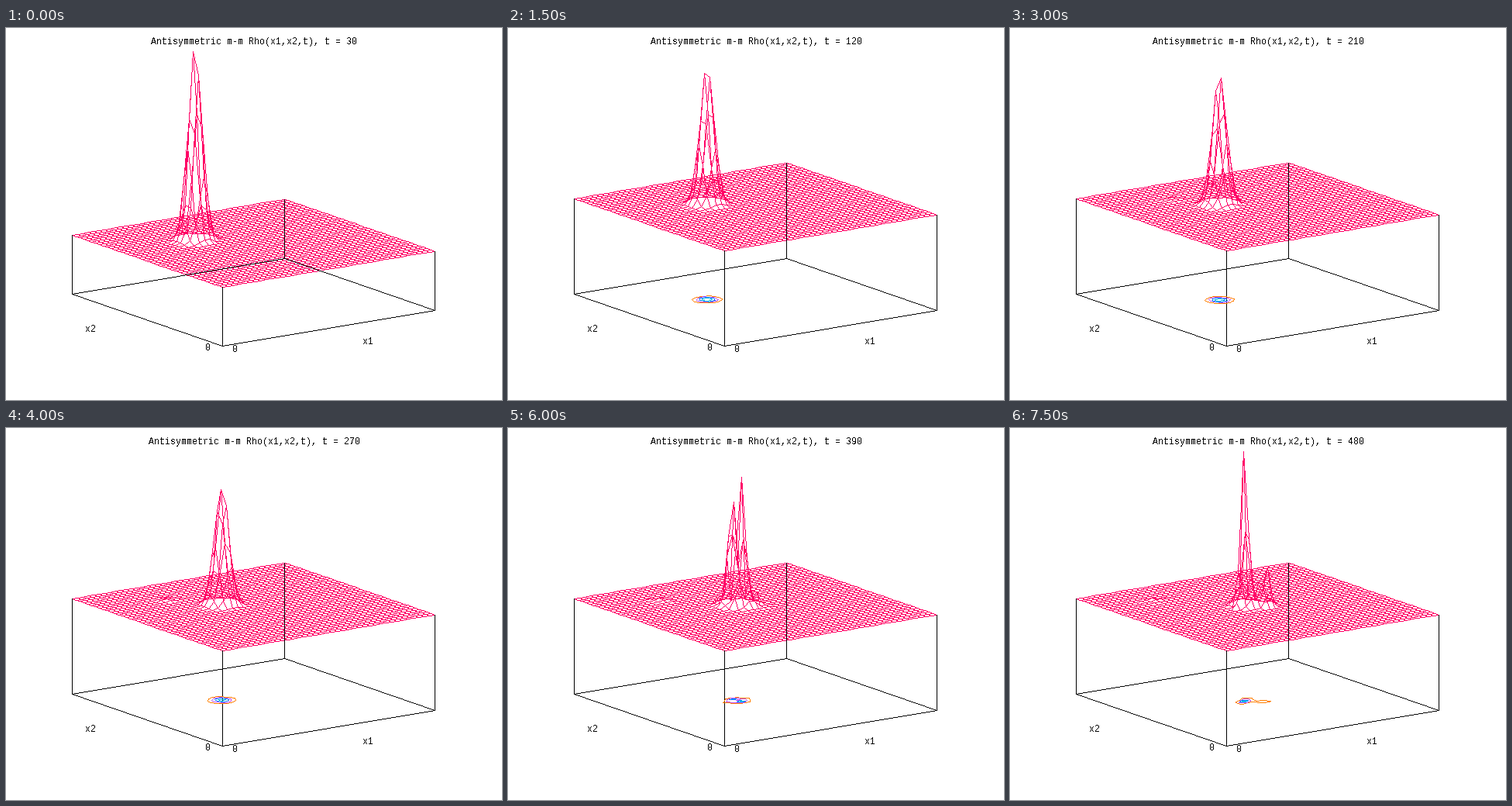
These frames come from a looping animation (640x480 px, 8 s). A matplotlib script:

```python
import numpy as np
import matplotlib.pyplot as plt
from matplotlib.animation import FuncAnimation
from matplotlib.colors import to_rgb

W, H, DPI = 640, 480, 100
FRAMES, STEP = 16, 500
N = 39                       # mesh cells per side
TOP = 27                     # the surface is cut off above this row
PINK = "#ff0066"
LEVELS = [27, 60, 95, 130]
LEVEL_COLORS = ["#ff8000", "#c050ff", "#0080ff", "#00b8e8"]

plt.rcParams.update({
    "font.family": "Liberation Mono",
    "font.size": 11.67 * 72 / DPI,
    "text.antialiased": False,
})

fig = plt.figure(figsize=(W / DPI, H / DPI), dpi=DPI, facecolor="white")
ax = fig.add_axes([0, 0, 1, 1])
ax.axis("off")
screen = ax.imshow(np.ones((H, W, 3)), aspect="auto", interpolation="nearest")
ax.set_autoscale_on(False)

ticks = np.linspace(0, 1, N + 1)
A, B = np.meshgrid(ticks, ticks, indexing="ij")


def project(a, b):
    return 279 + 274 * a - 194 * b, 410 - 46.5 * a - 67 * b


def unproject(x, rise):
    """Plane coordinates of a screen x and a rise above the front corner."""
    return np.linalg.solve([[274, -194], [46.5, 67]], [x - 279, rise])


def bump(x, rise, su, sv):
    """Gaussian with widths along the difference and sum of coordinates."""
    a, b = unproject(x, rise)
    u, v = (A - B) - (a - b), (A + B) - (a + b)
    return np.exp(-u**2 / (4 * su**2) - v**2 / (4 * sv**2))


def ramp(k, start, end):
    return float(np.clip((k - start) / (end - start), 0, 1))


GX, GY = project(A, B)


def density(k):
    x = np.interp(k, [0, 3, 6, 8, 12, 15], [243.5, 256.5, 270, 278, 294.5, 301.7])
    amp = 255 if k < 3 else np.interp(k, [3, 6, 8, 12, 15], [185, 174, 159, 225, 185])
    rise = 60.5 - k / 7
    width = 0.028 - 0.011 * ramp(k, 12, 15)
    fringe = np.sin(np.pi * (GX - 301) / 9.3) ** 2
    z = amp * bump(x, rise, width, 0.028)
    z = z + 38 * ramp(k, 9, 15) * bump(310, 58, 0.035, 0.026)
    z = z * (1 - 0.8 * ramp(k, 8, 12) * fringe)
    z = z + 52 * ramp(k, 12, 15) * bump(330, 57.5, 0.014, 0.018)
    ripple = bump(230 - 2.8 * k, 65, 0.03, 0.025)
    return z + 4 * ramp(k, 2, 7) * ripple * np.cos((GX - 210) / 4) ** 2


def stroke(canvas, p, q, color, top=0):
    """Draw one-pixel lines without smoothing from points p to points q."""
    p, q = (np.floor(np.asarray(v, float) + 0.5) for v in (p, q))
    steps = np.maximum(np.abs(q - p).max(axis=1), 1)
    t = np.minimum(np.arange(steps.max() + 1) / steps[:, None], 1)[..., None]
    dots = np.floor(p[:, None] + t * (q - p)[:, None] + 0.5).astype(int)
    x, y = dots.reshape(-1, 2).T
    keep = (x >= 0) & (x < W) & (y >= top) & (y < H)
    canvas[y[keep], x[keep]] = to_rgb(color)


def draw_mesh(canvas, y):
    pts = np.stack([GX, y], axis=-1)
    for grid in (pts, pts.swapaxes(0, 1)):
        stroke(canvas, grid[:-1].reshape(-1, 2), grid[1:].reshape(-1, 2), PINK, TOP)


def draw_box(canvas, lift):
    floor = np.array([project(a, b) for a, b in [(0, 0), (1, 0), (1, 1), (0, 1)]])
    stroke(canvas, floor, np.roll(floor, -1, axis=0), "black")
    stroke(canvas, floor, floor - [0, lift], "black")


def draw_contours(canvas, z):
    lines = ax.contour(GX, GY, z, levels=LEVELS)
    for color, paths in zip(LEVEL_COLORS, lines.allsegs):
        for path in paths:
            if len(path) > 1:
                stroke(canvas, path[:-1], path[1:], color)
    lines.remove()


title = ax.text(319.5, 20, "", ha="center", va="baseline")
for x, y, label in [(102, 392, "x2"), (460, 408, "x1"), (257, 416, "0"), (292, 418, "0")]:
    ax.text(x, y, label, ha="left", va="baseline")


def draw(k):
    flat = k < 3
    lift = 76 if flat else 123
    z = density(k)
    canvas = np.ones((H, W, 3))
    draw_mesh(canvas, GY - lift - z)
    draw_box(canvas, lift)
    if not flat:
        draw_contours(canvas, z)
    screen.set_data(canvas)
    title.set_text(f"Antisymmetric m-m Rho(x1,x2,t), t = {30 * (k + 1)}")
    return screen, title


anim = FuncAnimation(fig, draw, frames=FRAMES, interval=STEP,
                     init_func=lambda: draw(0), repeat=True, repeat_delay=0, blit=False)
plt.show()
```
